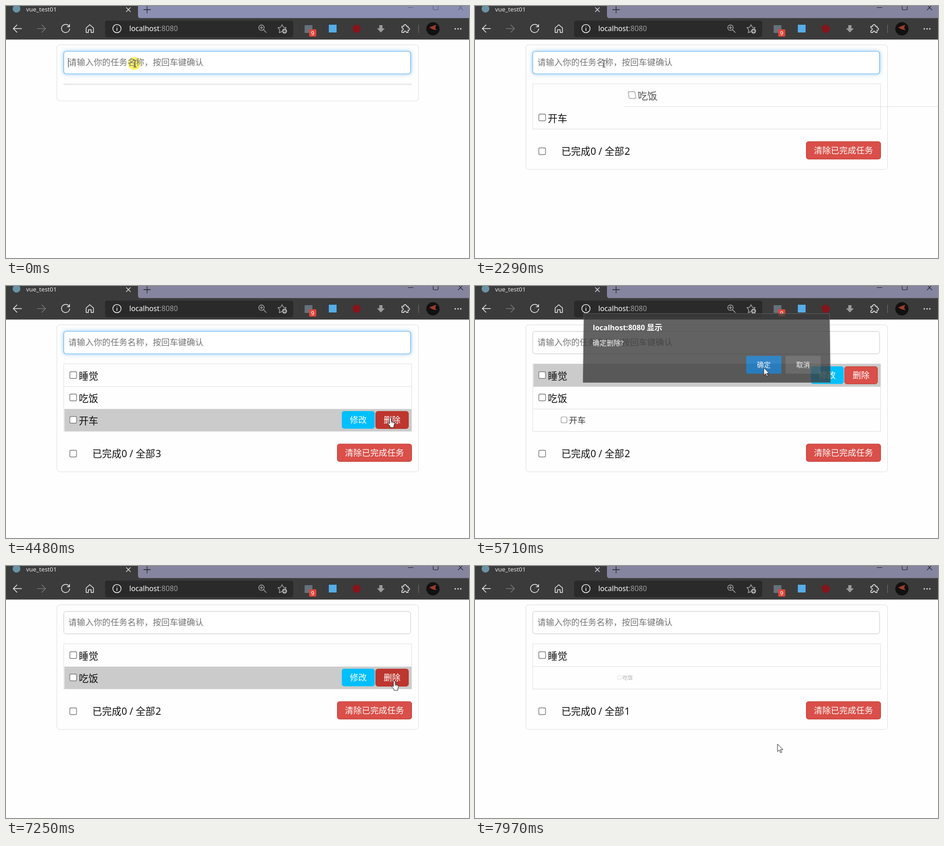
Write an HTML page that moves like this. It is 1014 px wide and 552 px high and loops after 8 s.

```html
<!DOCTYPE html>
<html lang="zh-CN">
<head>
<meta charset="utf-8">
<title>vue_test01</title>
<style>
html, body { margin: 0; width: 100%; height: 100%; overflow: hidden; background: #fefefe; }
svg { display: block; overflow: hidden; animation: scene 8s step-end infinite; }
text { font: 18.5px "Noto Sans", "Noto Sans CJK SC", sans-serif; fill: #fff; white-space: pre; }
.mid { text-anchor: middle; }
.big { font-size: 21.3px; fill: #111; }
.icon { fill: none; stroke: #f4f4f4; stroke-width: 1.5; stroke-linecap: round; stroke-linejoin: round; }
.dim { stroke: #a9a9a9; }
.line { fill: none; stroke: #ddd; }
.red { fill: #da4f49; stroke: #bd362f; }

/* shown only while the watched state equals --k */
.when { --d: calc(var(--is) - var(--k)); opacity: calc(1 - var(--d) * var(--d)); }
.typed { --is: var(--typed); }
.count { --is: var(--count); }
.hover { --is: var(--hover); }
.shape { --is: var(--cursor); }

/* hard state changes; a, b, c say which tasks are listed */
@keyframes scene {
  0%, 100% {
    --strip: #8b90b3; --ctl: #5d6076; --spot: 1; --caret: 1;
    --a: 0; --b: 0; --c: 0; --count: 0; --typed: 0;
    --hover: 0; --del: 0; --cursor: 0;
  }
  .625% { --strip: #888aa9; --ctl: #3c3d4a; --spot: .5; }
  1.25% { --strip: #85859f; --ctl: #1c1c24; --spot: 0; }
  3.25% { --typed: 1; }
  6.25% { --typed: 0; --caret: 0; --a: 1; --count: 1; }
  18.875% { --typed: 2; --caret: 1; }
  24.875% { --typed: 0; --caret: 0; --b: 1; --count: 2; }
  38.75% { --typed: 3; --caret: 1; }
  44.25% { --typed: 0; --caret: 0; --c: 1; --count: 3; }
  50.125% { --cursor: 1; }
  50.75% { --hover: 3; }
  52.125% { --hover: 2; }
  53.5% { --hover: 1; }
  54.3125% { --cursor: 2; }
  55.375% { --del: 1; }
  61.25% { --cursor: 1; }
  70.625% { --count: 2; --hover: 3; --del: 0; }
  76.625% { --hover: 2; --cursor: 2; }
  81.125% { --hover: 0; --cursor: 1; }
  83.125% { --a: 0; }
  85% { --hover: 2; --del: 1; --cursor: 2; }
  91% { --cursor: 1; }
  97.25% { --count: 1; --hover: 3; --del: 0; }
  98.5% { --hover: 0; }
}

#page { --rows: calc(var(--a) + var(--b) + var(--c)); }
#card { height: calc(123px + var(--rows) * 49px + min(var(--rows), 1) * 52px); }
#list { height: calc(2px + var(--rows) * 49px - min(var(--rows), 1) * 1px); }
#foot { opacity: min(var(--rows), 1); transform: translateY(calc(var(--rows) * 49px)); }
#caret { opacity: var(--caret); transform: translateX(calc(min(var(--typed), 1) * 37px)); }
#spot { opacity: var(--spot); }
#strip { fill: var(--strip); }
#ctl { stroke: var(--ctl); stroke-width: 1.1; fill: none; }
#del { opacity: var(--del); fill: #bd362f; }

#a { opacity: var(--a); transform: translateY(calc((var(--b) + var(--c)) * 49px)); }
#b { opacity: var(--b); transform: translateY(calc(var(--c) * 49px)); }
#c { opacity: var(--c); }
.enter, .leave { transform-origin: 508px 24.5px; }
.enter { animation: enter 8s var(--at) ease-out infinite; }
.leave { animation: leave 8s var(--end) ease infinite; }
@keyframes enter {
  0% { transform: translate(762px) skewX(-30deg); opacity: 0; }
  7.5% { transform: translate(0px) skewX(20deg); opacity: 1; }
  10% { transform: translate(0px) skewX(-5deg); }
  12.5%, 100% { transform: translate(0px) skewX(0deg); opacity: 1; }
}
@keyframes leave {
  0%, 20.01%, 100% { transform: scale(1); opacity: 1; }
  6.25%, 20% { transform: scale(.3); opacity: 0; }
}

#focus { filter: drop-shadow(0 0 5px rgba(82, 168, 236, .65)); animation: focus 8s linear infinite; }
@keyframes focus {
  0%, 60.5% { opacity: 1; }
  63%, 99.99% { opacity: 0; }
  100% { opacity: 1; }
}

#dialog { animation: dialog 8s linear infinite; }
@keyframes dialog {
  0%, 60.6%, 72.9%, 90.75%, 99.4%, 100% { opacity: 0; transform: translateY(-13px); }
  63.1%, 70.5%, 93.25%, 97.2% { opacity: 1; transform: translateY(0); }
  71.375% { opacity: .81; transform: translateY(0); }
}

#pointer { animation: move 8s ease-in-out infinite; }
@keyframes move {
  0%, 49.375% { transform: translate(282.5px, 126.5px); }
  54.125% { transform: translate(730px, 289px); }
  56%, 61.5% { transform: translate(842px, 289px); }
  69%, 71.875% { transform: translate(632.5px, 179px); }
  81.375%, 84.99% { transform: translate(850px, 270px); }
  85%, 88.125% { transform: translate(852px, 262px); }
  90%, 91.25% { transform: translate(850.5px, 251.5px); }
  95.6%, 98% { transform: translate(632.5px, 180px); }
  99.6%, 100% { transform: translate(662.5px, 390px); }
}
</style>
</head>
<body>
<svg width="1014" height="552" viewBox="0 0 1014 552">
  <defs>
    <rect id="box" x="139.7" y="16.7" width="14.8" height="14.8" rx="2.6" fill="#fff" stroke="#767676" stroke-width="1.4"/>
    <g id="tools">
      <path fill="#cacbca" d="M128 0H888V49H128Z"/>
      <rect x="735.5" y="5" width="72" height="38.500" rx="5" fill="#00bfff"/>
      <text class="mid" x="771.5" y="31">修改</text>
      <rect class="red" x="809.5" y="5.500" width="72" height="38" rx="5"/>
      <rect id="del" x="810" y="6" width="71" height="37" rx="5"/>
      <text class="mid" x="845.5" y="31">删除</text>
    </g>
  </defs>

  <!-- browser -->
  <path fill="#3b3b3b" d="M0 0H1014V73.500H0Z"/>
  <path id="strip" d="M289 0H1014V26.500H294Q289 26.500 289 21Z"/>
  <circle cx="23" cy="6" r="8.500" fill="#6b93a5"/>
  <text x="44" y="12" style="font-size:13.3px;fill:#e6e6e6">vue_test01</text>
  <path class="icon" style="stroke-width:1.2" d="M263.500 3.500l9 9m0-9l-9 9"/>
  <path stroke="#22232c" stroke-width="1.3" d="M301 8H317M309 0V16"/>
  <path id="ctl" d="M880 3.500H892M935.500-2V6Q935.500 8.500 938 8.500H944Q946.500 8.500 946.500 6V-2M990 9L1001-2M990-2L1001 9"/>

  <path class="icon" d="M16 49.500H34M24 41.500l-8 8 8 8"/>
  <path class="icon" style="stroke:#777" d="M68.500 49.500H86.500M78.500 41.500l8 8-8 8"/>
  <path class="icon" d="M138.500 45A9 9 0 1 0 139.500 50M139.200 40.500V45.500H134"/>
  <path class="icon" d="M175.500 48L183.500 41 191.500 48V58H186.500V52H180.500V58H175.500Z"/>
  <rect x="217" y="32" width="412" height="36.500" rx="5" fill="#2a2a2a"/>
  <circle class="icon" cx="243" cy="49.500" r="9"/>
  <path class="icon" d="M243 48.500V54M243 45V45.100"/>
  <text x="270" y="55" style="font-size:15.7px">localhost<tspan fill="#9d9d9d">:8080</tspan></text>
  <g class="icon dim">
    <circle cx="559.500" cy="47.500" r="6"/>
    <path d="M564 52L570 58M556.500 47.500H562.500M559.500 44.500V50.500"/>
    <path d="M604 56L598.500 58.500 599.500 52 595.500 47.500 601.500 46.500 604.500 41 607.500 46.500 613.500 47.500 611.500 50"/>
  </g>
  <circle cx="610" cy="55" r="5.500" fill="#a9a9a9"/>
  <path stroke="#2a2a2a" stroke-width="1.300" d="M607 55H613M610 52V58"/>

  <rect x="654" y="42" width="17" height="17" fill="#66717a"/>
  <rect x="664" y="51" width="15.500" height="16" rx="2" fill="#dd4538"/>
  <text class="mid" x="671.700" y="63.500" style="font-size:12.500px">9</text>
  <rect x="707" y="41" width="17" height="17" fill="#55aee8"/>
  <circle cx="768" cy="50" r="9" fill="#85151a"/>
  <path fill="#9b9b9b" d="M817.500 42H824.500V49H829.500L821 58 812.500 49H817.500Z"/>
  <path class="icon" d="M867 44.500H871C870 39.500 878 39.500 877 44.500H880.500V48C885 47 885 54 880.500 53V58H876.500C877.500 54 870.500 54 871.500 58H867V53.500C871 54 871 47.500 867 48Z"/>
  <path stroke="#777" d="M903.500 41V59"/>
  <circle cx="935" cy="50" r="14.500" fill="#111"/>
  <path fill="#9d3a2a" d="M927 47L934 44 942 41 940 48 943 53 934 51Z"/>
  <g fill="#f4f4f4"><circle cx="984" cy="50" r="1.500"/><circle cx="990" cy="50" r="1.500"/><circle cx="996" cy="50" r="1.500"/></g>

  <!-- task list -->
  <g id="page">
    <rect id="card" class="line" x="111.500" y="85" width="792" rx="6"/>
    <rect x="126.500" y="99.500" width="759.500" height="49" rx="5" fill="#fff" stroke="#c4c4c4"/>
    <rect id="focus" x="126.500" y="99.500" width="759.500" height="49" rx="5" fill="#fff" stroke="#6cb5ee" stroke-width="1.200"/>
    <circle id="spot" cx="281" cy="126" r="14" fill="#fbf16b"/>
    <text class="typed when" style="--k:0;fill:#757575" x="136.500" y="130">请输入你的任务名称，按回车键确认</text>
    <g style="--ink:#222">
      <text class="typed when" style="--k:1;fill:var(--ink)" x="136.500" y="132">开车</text>
      <text class="typed when" style="--k:2;fill:var(--ink)" x="136.500" y="132">吃饭</text>
      <text class="typed when" style="--k:3;fill:var(--ink)" x="136.500" y="132">睡觉</text>
    </g>
    <path id="caret" stroke="#111" d="M136.500 114V134.500"/>

    <rect id="list" class="line" x="126.500" y="170.500" width="762"/>
    <g transform="translate(0 171)">
      <g id="a"><g class="enter" style="--at:470ms"><g class="leave" style="--end:5635ms">
        <use href="#tools" class="hover when" style="--k:1"/>
        <use href="#box"/><text class="big" x="159.500" y="33.500">开车</text>
      </g></g></g>
      <g id="b"><g class="enter" style="--at:1958ms"><g class="leave" style="--end:7775ms">
        <use href="#tools" class="hover when" style="--k:2"/>
        <use href="#box"/><text class="big" x="159.500" y="33.500">吃饭</text>
      </g><path class="line" d="M127 49.500H888"/></g></g>
      <g id="c"><g class="enter" style="--at:3510ms">
        <use href="#tools" class="hover when" style="--k:3"/>
        <use href="#box"/><text class="big" x="159.500" y="33.500">睡觉</text>
        <path class="line" d="M127 49.500H888"/>
      </g></g>
    </g>

    <g id="foot">
      <use href="#box" y="196"/>
      <text class="big" x="189" y="228">已完成0 / 全部</text>
      <text class="big count when" style="--k:1" x="327.500" y="228">1</text>
      <text class="big count when" style="--k:2" x="327.500" y="228">2</text>
      <text class="big count when" style="--k:3" x="327.500" y="228">3</text>
      <rect class="red" x="725.500" y="199" width="163" height="38.500" rx="5"/>
      <text class="mid" x="807" y="225">清除已完成任务</text>
    </g>
  </g>

  <!-- confirm box -->
  <g id="dialog">
    <path fill="#3b3b3b" stroke="#6e6e6e" d="M238.500 60.500H776.500L778.500 211.500H236.500Z"/>
    <text x="258" y="97" style="font-size:16px;font-weight:700">localhost:8080 <tspan font-size="17">显示</tspan></text>
    <text x="257.500" y="130.500" style="font-size:15.300px">确定删除?</text>
    <rect x="594" y="153" width="77" height="39" rx="2" fill="#0068b8"/>
    <text class="mid" x="632.500" y="178" style="font-size:15px">确定</text>
    <rect x="680" y="153" width="77" height="39" rx="2" fill="#525252"/>
    <text class="mid" x="718.500" y="178" style="font-size:15px">取消</text>
  </g>

  <g id="pointer" stroke-linejoin="round">
    <path class="shape when" style="--k:0" fill="none" stroke="#222" stroke-width="1.200" d="M-3.500-7.500H-1.500L0-6.500 1.500-7.500H3.500M0-6.500V6.500M-3.500 7.500H-1.500L0 6.500 1.500 7.500H3.500"/>
    <path class="shape when" style="--k:1" fill="#fff" stroke="#111" d="M0 0V16.500L4 13 6.700 19 9.200 18 6.600 12.200H11.800Z"/>
    <g class="shape when" style="--k:2" stroke="#111">
      <path fill="#fff" d="M-2 2C-2-.6 2-.6 2 2V7.500L8 9.500Q9.500 10 9.300 12.500L7.500 17V21H-1V18L-5.500 13Q-6 10.500-3.500 11L-2 12.500Z"/>
      <path fill="none" stroke-width=".8" d="M2 7.500V11M4.500 8.500V11.500M7 9.500V12"/>
    </g>
  </g>
</svg>
</body>
</html>
```
